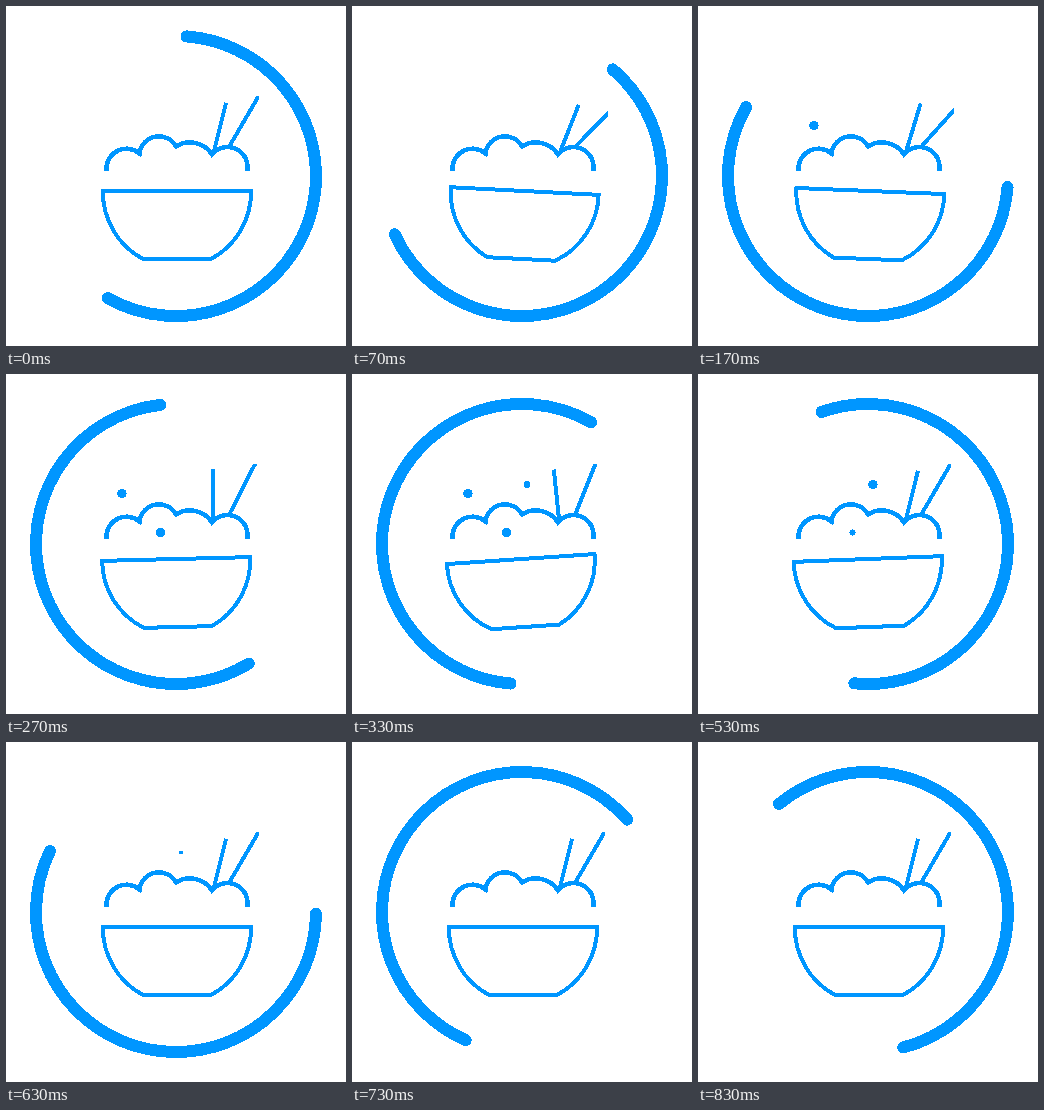
Animation of 340x340 px, one loop 0.86 s. Source, as an HTML page:

```html
<!DOCTYPE html>
<html lang="en">
<head>
<meta charset="utf-8">
<title>Rice bowl loader</title>
<style>
  html, body { margin: 0; width: 100%; height: 100%; overflow: hidden; background: #fff; }
  svg {
    display: block; width: 100vw; height: 100vh;
    fill: none; stroke: #0096ff; stroke-width: 4; shape-rendering: crispEdges;
  }
  #ring { stroke-width: 12; stroke-linecap: round; }
  #rice { stroke-width: 4.5; }
  #right { stroke-linecap: round; }
  .dot { fill: #0096ff; stroke: none; }
</style>
</head>
<body>
<svg viewBox="0 0 340 340">
  <clipPath id="cut"><rect x="180" y="90" width="76" height="70"/></clipPath>
  <circle id="ring" cx="170" cy="170" r="140" pathLength="360" stroke-dasharray="205 155"/>
  <path id="rice" d="M100.5 165V162.5A20 20 0 0 1 133.5 147.5A19.5 19.5 0 0 1 170 140.5A26 26 0 0 1 206 148.5A20 20 0 0 1 241.5 162.5V165"/>
  <path id="bowl" d="M97 185H245A75.5 75.5 0 0 1 205 253H137A75.5 75.5 0 0 1 97 185Z"/>
  <path id="left" d="M207.3 148L220 96.8"/>
  <g clip-path="url(#cut)"><path id="right" d="M223 141L251.5 92"/></g>
  <circle class="dot" cx="116" cy="119.5"/>
  <circle class="dot" cx="154.5" cy="158.5"/>
  <circle class="dot" cx="175" cy="110.5"/>
</svg>
<script>
  const LOOP = 860, STEP = 100 / 3, HALF = 13 * STEP;
  const ring = document.getElementById("ring");
  const dots = document.querySelectorAll(".dot");

  // Progress from 0 to 1 between two times, linear or eased.
  const ramp = (t, from, to) => Math.min(1, Math.max(0, (t - from) / (to - from)));
  const ease = (t, from, to) => (1 - Math.cos(Math.PI * ramp(t, from, to))) / 2;

  const turn = (el, angle, x, y) =>
    el.setAttribute("transform", `rotate(${angle} ${x} ${y})`);

  // Tips one way, swings to the other, then settles by the end of span.
  function sway(id, x, y, high, low, span, t) {
    const peak = 90, dip = 0.64 * span;
    const angle = high * ease(t, 0, peak)
      + (low - high) * ease(t, peak, dip)
      - low * ease(t, dip, span);
    turn(document.getElementById(id), angle, x, y);
  }

  // A steady first half, then a second half at about twice the speed.
  function spin(t) {
    const p = ramp(t, 0, HALF), q = ramp(t, HALF, 2 * HALF);
    return 4.3 + 234.5 * p + 485.5 * (q - 0.05 * Math.sqrt(q * (1 - q)));
  }

  function draw(ms) {
    // Poses hold for one step each, on a 10 ms clock.
    const tick = Math.floor((ms % LOOP) / 10) * 10;
    const t = Math.floor((tick + 4) / STEP) * STEP;

    turn(ring, spin(t) - 90, 170, 170);
    sway("bowl", 171, 219, 3.5, -5, 640, t);
    sway("left", 207.3, 148, 9, -20, 537, t);
    sway("right", 223, 141, 17, -8.5, 537, t);

    dots.forEach((dot, i) => {
      const on = 80 + 97 * i, off = 420 + 78 * i;
      dot.setAttribute("r", 4.7 * (ramp(t, on, on + 85) - ramp(t, off, off + 100)));
    });
  }

  const start = performance.now();
  function frame() {
    draw(performance.now() - start);
    requestAnimationFrame(frame);
  }
  frame();
</script>
</body>
</html>
```
